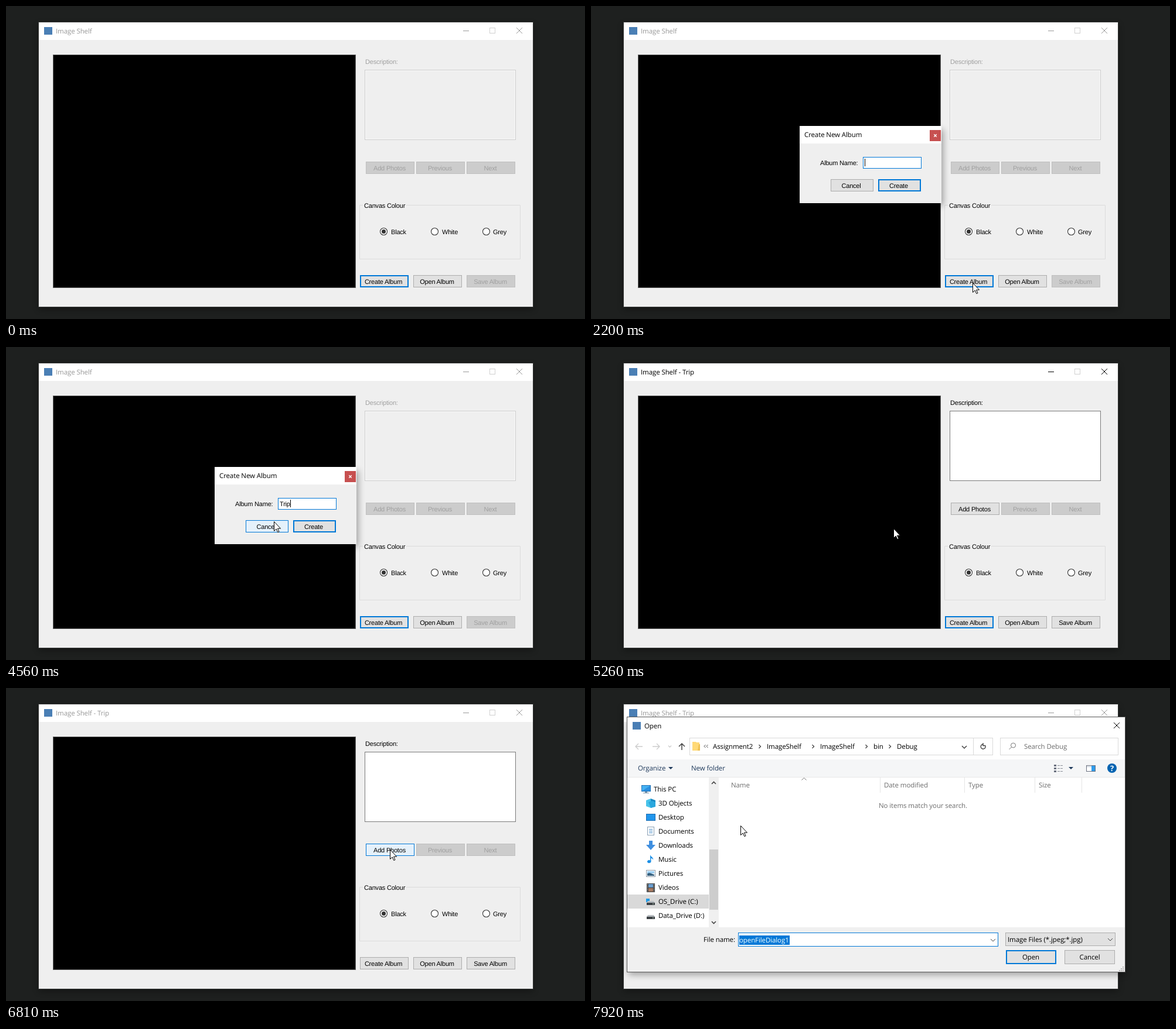
An HTML page that plays this animation: 988x535 px, repeating every 7.99 s.

```html
<!DOCTYPE html>
<html lang="en">
<head>
<meta charset="utf-8">
<title>Album demo</title>
<style>
html,body{margin:0;width:100%;height:100%;overflow:hidden;background:#1e201f}
svg{display:block;width:100%;height:100%;font:11.5px "Open Sans","Noto Sans",sans-serif;letter-spacing:-.1px;text-rendering:geometricPrecision}
text{white-space:pre}
.ms{font:11px "Liberation Sans",Arial,sans-serif;letter-spacing:-.2px}
.mid text{text-anchor:middle}
.ln{fill:none;stroke:currentColor}
.btn rect{fill:#e1e1e1;stroke:#adadad}
.off rect{fill:#ccc;stroke:#bfbfbf}
.off text,.dim{fill:#a0a0a0}
.btn .focus{fill:none;stroke:#0078d7;stroke-width:2}
.grey{fill:#6d6d6d}
.navy{fill:#1e395b}

/* everything shares one clock */
.t,.t rect,.t text{animation:7.99s step-end infinite}
#bar{animation-name:bar}
#trip{animation-name:trip}
#create rect{animation-name:create}
#create .focus{animation-name:createFocus}
#open rect{animation-name:open}
#add rect{animation-name:add}
#save rect{animation-name:save}
#add text,#save text,#descLabel{animation-name:ink}
#desc{animation-name:desc}
#descIn{animation-name:descIn}
#dlg{animation-name:dlg}
#field{animation-name:field}
#cancel rect{animation-name:cancel}
#ok rect{animation-name:ok}
#ok .focus{animation-name:none}
#caret{animation-name:caret}
#c1{animation-name:c1}
#c2{animation-name:c2}
#c3{animation-name:c3}
#c4{animation-name:c4}
#files{animation-name:files}
#selCaret{animation-name:selCaret}
#tools{animation-name:tools}
#navShort{animation-name:navShort}
#navFull{animation-name:navFull}
#ptrShow{animation-name:ptrShow}
#ptr{animation-name:ptr}

@keyframes bar{0%,27.534%,85.231%{color:#999}26.658%,65.832%{color:#000}}
@keyframes trip{0%{fill-opacity:0}65.832%,100%{fill-opacity:1}}
@keyframes create{0%,27.534%{fill:#e1e1e1}18.273%{fill:#e5f1fb}26.658%{fill:#cce4f7}100%{fill:#e1e1e1}}
@keyframes createFocus{0%{opacity:1}83.605%,100%{opacity:0}}
@keyframes open{0%,18.273%,100%{fill:#e1e1e1;stroke:#adadad}17.397%{fill:#e5f1fb;stroke:#0078d7}}
@keyframes add{
0%{fill:#ccc;stroke:#bfbfbf}
65.832%{fill:#e1e1e1;stroke:#adadad}
76.095%,85.231%,100%{fill:#e5f1fb;stroke:#0078d7}
83.605%{fill:#cce4f7;stroke:#005499}}
@keyframes save{0%{fill:#ccc;stroke:#bfbfbf}65.832%,100%{fill:#e1e1e1;stroke:#adadad}}
@keyframes ink{0%{fill:#a0a0a0}65.832%,100%{fill:#000}}
@keyframes desc{0%{fill:#efefef;stroke:#ccc}65.832%,100%{fill:#fff;stroke:#7a7a7a}}
@keyframes descIn{0%{opacity:1}65.832%,100%{opacity:0}}
@keyframes dlg{0%,65.832%,100%{opacity:0}27.534%{opacity:1}}
@keyframes field{0%{stroke:#0078d7}63.955%,100%{stroke:#7a7a7a}}
@keyframes cancel{
0%,33.542%,59.7%,100%{fill:#e1e1e1;stroke:#adadad}
32.666%,57.071%{fill:#e5f1fb;stroke:#0078d7}}
@keyframes ok{0%,100%{fill:#e1e1e1}60.576%,64.831%{fill:#e5f1fb}63.955%{fill:#cce4f7}}
@keyframes caret{
0%{opacity:1;transform:none}
34.418%{opacity:0;transform:none}
39.424%{opacity:1;transform:translate(7px)}
41.927%{opacity:1;transform:translate(10px)}
42.803%{opacity:1;transform:translate(12px)}
43.679%,57.071%{opacity:1;transform:translate(18px)}
50.312%,63.705%,100%{opacity:0;transform:translate(18px)}}
@keyframes c1{0%{fill-opacity:0}39.424%,100%{fill-opacity:1}}
@keyframes c2{0%{fill-opacity:0}41.927%,100%{fill-opacity:1}}
@keyframes c3{0%{fill-opacity:0}42.803%,100%{fill-opacity:1}}
@keyframes c4{0%{fill-opacity:0}43.679%,100%{fill-opacity:1}}
@keyframes files{0%{opacity:0}88.61%,100%{opacity:1}}
@keyframes selCaret{0%{opacity:1}95.243%,100%{opacity:0}}
@keyframes tools{0%{opacity:0}89.486%,100%{opacity:1}}
@keyframes navShort{0%{opacity:1}90.362%,100%{opacity:0}}
@keyframes navFull{0%{opacity:0}90.362%,100%{opacity:1}}
@keyframes ptrShow{0%,55.319%,100%{opacity:1}39.424%{opacity:0}}
@keyframes ptr{
0%,1.627%{transform:translate(949px,541px);animation-timing-function:steps(7)}
7.759%,9.387%{transform:translate(949px,450px);animation-timing-function:steps(5)}
13.892%{transform:translate(830px,443px);animation-timing-function:steps(6)}
19.149%,29.161%{transform:translate(651px,473px);animation-timing-function:steps(4)}
32.666%{transform:translate(478px,310px);animation-timing-function:steps(2)}
34.418%,54.443%{transform:translate(459px,272px);animation-timing-function:steps(3)}
57.071%{transform:translate(457px,298px);animation-timing-function:steps(6)}
62.328%,69.962%{transform:translate(516px,310px);animation-timing-function:steps(9)}
77.847%,92.115%{transform:translate(655px,276px);animation-timing-function:steps(7)}
98.248%{transform:translate(305px,221px);animation-timing-function:step-end}
99.123%,100%{transform:translate(255px,235px)}}
</style>
</head>
<body>
<svg viewBox="0 0 988 535">
<defs>
  <filter id="soft" x="-20%" y="-20%" width="140%" height="140%"><feGaussianBlur stdDeviation="6"/></filter>
  <rect id="app" width="14" height="13" fill="#4a7fb5"/>
  <path id="x" class="ln" d="M0 0l10 10M10 0L0 10"/>
  <path id="down" class="ln" d="M-4 -2L0 2L4 -2"/>
  <path id="gt" class="ln" stroke-width="1.3" d="M-1.5 -3L1.5 0L-1.5 3"/>
  <path id="tri" d="M-4 -2h8l-4 4z"/>
  <g id="pc">
    <rect x=".5" y=".5" width="15" height="10" fill="#45b1f2" stroke="#2472b5"/>
    <path d="M1 10L15 1v9z" fill="#2b8fe0"/>
    <path d="M6 11h4v2h3v1H3v-1h3z" fill="#7c97ad"/>
  </g>
  <g id="disk">
    <path d="M2 0h10l2 3H0z" fill="#b9bec2"/>
    <rect y="3" width="14" height="4" fill="#3c4044"/>
    <rect x="10" y="4.5" width="2" height="1" fill="#d5f0d5"/>
  </g>
</defs>

<rect width="988" height="535" fill="#1e201f"/>
<rect x="56" y="32" width="843" height="486" opacity=".4" filter="url(#soft)"/>

<!-- main window -->
<rect x="55.5" y="27.5" width="844" height="487" fill="#efefef" stroke="#383a39"/>
<rect x="56" y="28" width="843" height="30" fill="#fff"/>
<use href="#app" x="65" y="36"/>
<g id="bar" class="t" color="#999">
  <text x="85" y="47" fill="currentColor" style="animation:none">Image Shelf<tspan id="trip" class="t"> - Trip</tspan></text>
  <path class="ln" d="M780 42.5h10"/>
  <use href="#x" x="871" y="37"/>
</g>
<rect x="825.5" y="37.5" width="9" height="9" fill="none" stroke="#d0d0d0"/>
<rect x="80.5" y="83.5" width="516" height="398" stroke="#646464"/>

<g class="ms">
  <text id="descLabel" class="t dim" x="613" y="99">Description:</text>
  <rect id="desc" class="t" x="612.5" y="109.5" width="257" height="119" fill="#efefef" stroke="#ccc"/>
  <rect id="descIn" class="t" x="613.5" y="110.5" width="255" height="117" fill="none" stroke="#fafafa"/>
  <path d="M609 340.5H603.5V432.5H877.5V340.5H683" fill="none" stroke="#dcdcdc"/>
  <text x="611" y="345">Canvas Colour</text>
  <g fill="#fff" stroke="#333" stroke-width="1.1">
    <circle cx="644.5" cy="385.5" r="6"/><circle cx="731.5" cy="385.5" r="6"/><circle cx="819.5" cy="385.5" r="6"/>
  </g>
  <circle cx="644.5" cy="385.5" r="3.5" fill="#333"/>
  <text x="657" y="390">Black</text><text x="744" y="390">White</text><text x="831" y="390">Grey</text>

  <g class="mid">
    <g id="add" class="t btn off" transform="translate(614 266)"><rect x=".5" y=".5" width="82" height="20"/><text x="40.5" y="15">Add Photos</text></g>
    <g class="btn off" transform="translate(700 266)"><rect x=".5" y=".5" width="82" height="20"/><text x="40.5" y="15">Previous</text></g>
    <g class="btn off" transform="translate(786 266)"><rect x=".5" y=".5" width="82" height="20"/><text x="40.5" y="15">Next</text></g>
    <g id="create" class="t btn" transform="translate(604 460)"><rect x=".5" y=".5" width="82" height="20"/><rect class="focus" x="1" y="1" width="81" height="19"/><text x="40" y="15">Create Album</text></g>
    <g id="open" class="t btn" transform="translate(695 460)"><rect x=".5" y=".5" width="82" height="20"/><text x="40.5" y="15">Open Album</text></g>
    <g id="save" class="t btn off" transform="translate(786 460)"><rect x=".5" y=".5" width="82" height="20"/><text x="40.5" y="15">Save Album</text></g>
  </g>
</g>

<!-- name prompt -->
<g id="dlg" class="t" opacity="0">
  <g style="animation:none">
    <rect x="358" y="211" width="243" height="130" opacity=".35" filter="url(#soft)" style="animation:none"/>
    <rect x="356" y="205" width="242" height="132" fill="#efefef"/>
    <rect x="356" y="205" width="242" height="30" fill="#fff"/>
    <text x="364" y="224">Create New Album</text>
    <rect x="578" y="212" width="19" height="19" fill="#c75050"/>
    <path d="M585.3 219.3l4.4 4.4M589.7 219.3l-4.4 4.4" stroke="#fff" stroke-width="1.4"/>
    <g class="ms">
      <text x="391" y="272">Album Name:</text>
      <rect id="field" class="t" x="464.5" y="258.5" width="99" height="19" fill="#fff" stroke="#0078d7"/>
      <text x="467" y="272"><tspan id="c1" class="t">T</tspan><tspan id="c2" class="t">r</tspan><tspan id="c3" class="t">i</tspan><tspan id="c4" class="t">p</tspan></text>
      <rect id="caret" class="t" x="467" y="261" width="1" height="13"/>
      <g class="mid">
        <g id="cancel" class="t btn" transform="translate(409 296)"><rect x=".5" y=".5" width="72" height="20"/><text x="35" y="15">Cancel</text></g>
        <g id="ok" class="t btn" transform="translate(490 296)"><rect x=".5" y=".5" width="72" height="20"/><rect class="focus" x="1" y="1" width="71" height="19"/><text x="35" y="15">Create</text></g>
      </g>
    </g>
  </g>
</g>

<!-- file chooser -->
<g id="files" class="t" opacity="0">
  <rect x="64" y="56" width="848" height="434" opacity=".35" filter="url(#soft)"/>
  <rect x="61.5" y="49.5" width="850" height="436" fill="#fff" stroke="#5a5a5a"/>
  <rect x="62" y="122" width="849" height="30" fill="#f5f6f7"/>
  <rect x="62" y="152" width="849" height="1" fill="#e8e8e8"/>
  <rect x="62" y="409" width="849" height="76" fill="#f0f0f0"/>
  <use href="#app" x="71" y="58"/>
  <text x="91" y="69">Open</text>
  <use href="#x" x="892" y="59"/>
  <rect x="845.5" y="132.5" width="15" height="10" fill="#fff" stroke="#6b7180"/>
  <rect x="854" y="133" width="6" height="9" fill="#2f9bea"/>
  <path d="M846 134.5h8" stroke="#b9c3cf"/>
  <circle cx="889" cy="137" r="8" fill="#0063b1"/>
  <text x="889" y="141.5" fill="#fff" font-weight="700" font-size="13" text-anchor="middle">?</text>

  <path d="M493.5 153v26M637.5 153v26M757.5 153v26M837.5 153v26" stroke="#e5e5e5"/>
  <path class="ln" d="M359.5 157.5l4 -4l4 4" color="#777"/>
  <g class="grey">
    <text x="239" y="170">Name</text><text x="500" y="170">Date modified</text>
    <text x="644" y="170">Type</text><text x="764" y="170">Size</text>
    <text x="491" y="205">No items match your search.</text>
  </g>

  <g id="navShort" class="t">
    <rect x="62" y="233" width="156" height="24" fill="#d9d9d9"/>
    <path d="M96 174l1.6 5 5-.4-4 3.2 2 5.2-4.3-2.8-5.3 3 2.4-5-4.4-3.2 5.3-.4z" fill="#2f8fdc"/>
    <circle cx="94" cy="213" r="6" fill="#0f6cbd"/>
    <use href="#pc" x="86" y="238"/>
    <g transform="translate(86 269)">
      <rect x="5" y="1" width="10" height="8" fill="#45b1f2" stroke="#2472b5"/>
      <rect x="1" y="6" width="10" height="7" fill="#2b8fe0" stroke="#1f5f99"/>
      <path d="M4 15h6" stroke="#7c97ad" stroke-width="2"/>
    </g>
    <text x="107" y="185">Quick access</text><text x="107" y="217">MistHold</text>
    <text x="107" y="249">This PC</text><text x="107" y="281">Network</text>
  </g>

  <g id="navFull" class="t" opacity="0">
    <rect x="62" y="353" width="139" height="24" fill="#d9d9d9"/>
    <rect x="201" y="153" width="17" height="256" fill="#f0f0f0"/>
    <rect x="202" y="276" width="15" height="103" fill="#cdcdcd"/>
    <path class="ln" stroke-width="1.6" color="#444" d="M206 164l3.5-3.5l3.5 3.5M206 399l3.5 3.5l3.5-3.5"/>
    <use href="#pc" x="86" y="166"/>
    <path d="M94 192l8-3v16l-8-3z" fill="#49c3ea"/><path d="M102 189l8 3v10l-8 3z" fill="#1b8ac4"/><path d="M98 195l6-2 6 2v8l-8 2z" fill="#2aa7dd"/>
    <rect x="94.5" y="215.5" width="15" height="11" fill="#2196ec" stroke="#1c6cb0"/>
    <rect x="96.5" y="237.5" width="11" height="14" fill="#fff" stroke="#8aa0b4"/>
    <path d="M99 241.5h6M99 244.5h6M99 247.5h6" stroke="#3d86c6"/>
    <path d="M99 261h6v7h5l-8 9-8-9h5z" fill="#3f8fe0"/>
    <path d="M101 285c1 4 6 4 5 9c-1-3-3-3-3.500-3v6a3.300 2.600 0 1 1-1.500-2.500z" fill="#1c8fe6"/>
    <rect x="94.500" y="311.500" width="15" height="11" fill="#fff" stroke="#8b98a5"/>
    <rect x="96" y="313" width="12" height="4" fill="#9fd0f3"/><path d="M96 321v-4l4-1 8 3v2z" fill="#37617f"/>
    <rect x="95" y="334" width="14" height="15" fill="#3a3a3a"/>
    <rect x="98" y="335" width="8" height="6" fill="#6c9fd0"/><rect x="98" y="342" width="8" height="6" fill="#a67a62"/>
    <path d="M96.500 335v13M107.500 335v13" stroke="#ddd" stroke-dasharray="1.500 1.500"/>
    <rect x="94" y="360" width="6" height="6" fill="#1f9be8"/>
    <use href="#disk" x="95" y="364"/><use href="#disk" x="95" y="388"/>
    <text x="107" y="177">This PC</text>
    <text x="115" y="201">3D Objects</text><text x="115" y="225">Desktop</text>
    <text x="115" y="249">Documents</text><text x="115" y="273">Downloads</text>
    <text x="115" y="297">Music</text><text x="115" y="321">Pictures</text>
    <text x="115" y="345">Videos</text><text x="115" y="369">OS_Drive (C:)</text>
    <text x="115" y="393">Data_Drive (D:)</text>
  </g>

  <g id="tools" class="t" opacity="0">
    <path class="ln" stroke-width="1.300" color="#ccc" d="M88 100H76M81 95l-5 5l5 5M105 100h12M112 95l5 5l-5 5M132 98.500l2.500 2.500l2.500-2.500"/>
    <path class="ln" stroke-width="1.500" color="#444" d="M155 106V95M150 100l5-5l5 5"/>
    <g fill="#fff" stroke="#d9d9d9">
      <rect x="168.500" y="85.500" width="517" height="29"/><path d="M652.500 86v28"/>
      <rect x="698.500" y="85.500" width="201" height="29"/>
    </g>
    <path d="M173 92h6l1 1h5v14h-12z" fill="#ffd977"/><path d="M184 96h2v11h-4z" fill="#eec053"/>
    <path class="ln" color="#444" d="M195.500 97l-2.500 2.500l2.500 2.500M199.500 97l-2.500 2.500l2.500 2.500"/>
    <text x="208" y="104">Assignment2</text><text x="300" y="104">ImageShelf</text>
    <text x="391" y="104">ImageShelf</text><text x="482" y="104">bin</text><text x="522" y="104">Debug</text>
    <g color="#444">
      <use href="#gt" x="288" y="100"/><use href="#gt" x="379" y="100"/><use href="#gt" x="470" y="100"/><use href="#gt" x="510" y="100"/>
      <use href="#down" x="637" y="101" stroke-width="1.500"/>
      <path class="ln" stroke-width="1.400" d="M672.500 98a4 4 0 1 1-3-1.800M669 94v4.500h4"/>
    </g>
    <circle cx="720.500" cy="98" r="4" fill="none" stroke="#777"/><path d="M717.500 101l-4 4" stroke="#777"/>
    <text class="grey" x="739" y="104">Search Debug</text>
    <g class="navy">
      <text x="80" y="141">Organize</text><text x="171" y="141">New folder</text>
      <use href="#tri" x="136" y="137"/><use href="#tri" x="819" y="137"/>
    </g>
    <path d="M790 132.500h4M790 137.500h4M790 142.500h4" stroke="#6b7180" stroke-width="3"/>
    <path d="M796 132.500h10M796 137.500h10M796 142.500h10" stroke="#8a8f98" stroke-dasharray="4 1"/>
  </g>

  <text x="192" y="434">File name:</text>
  <rect x="251.500" y="418.500" width="443" height="23" fill="#fff" stroke="#0078d7"/>
  <rect x="253" y="423" width="86" height="16" fill="#0078d7"/>
  <text x="253" y="435" fill="#fff">openFileDialog1</text>
  <rect id="selCaret" class="t" x="338" y="423" width="1" height="16" fill="#ff8728"/>
  <rect x="707.500" y="418.500" width="187" height="22" fill="#e1e1e1" stroke="#adadad"/>
  <text x="711" y="434">Image Files (*.jpeg;*.jpg)</text>
  <g color="#444"><use href="#down" x="686" y="431"/><use href="#down" x="886" y="430"/></g>
  <g class="mid">
    <g class="btn" transform="translate(708 448)"><rect x=".5" y=".5" width="85" height="23"/><rect class="focus" x="1" y="1" width="84" height="22"/><text x="42.500" y="16">Open</text></g>
    <g class="btn" transform="translate(808 448)"><rect x=".5" y=".5" width="85" height="23"/><text x="43" y="16">Cancel</text></g>
  </g>
  <path d="M907 477h2M904 480h5M901 483h8" stroke="#b5b5b5" stroke-width="2" stroke-dasharray="2 1"/>
</g>

<g id="ptrShow" class="t"><g id="ptr" class="t">
  <path d="M.5 .5V16.500L4.200 13L6.800 18.700L9 17.700L6.500 12.200H11.500Z" fill="#fff" stroke="#000"/>
</g></g>
</svg>
</body>
</html>
```
